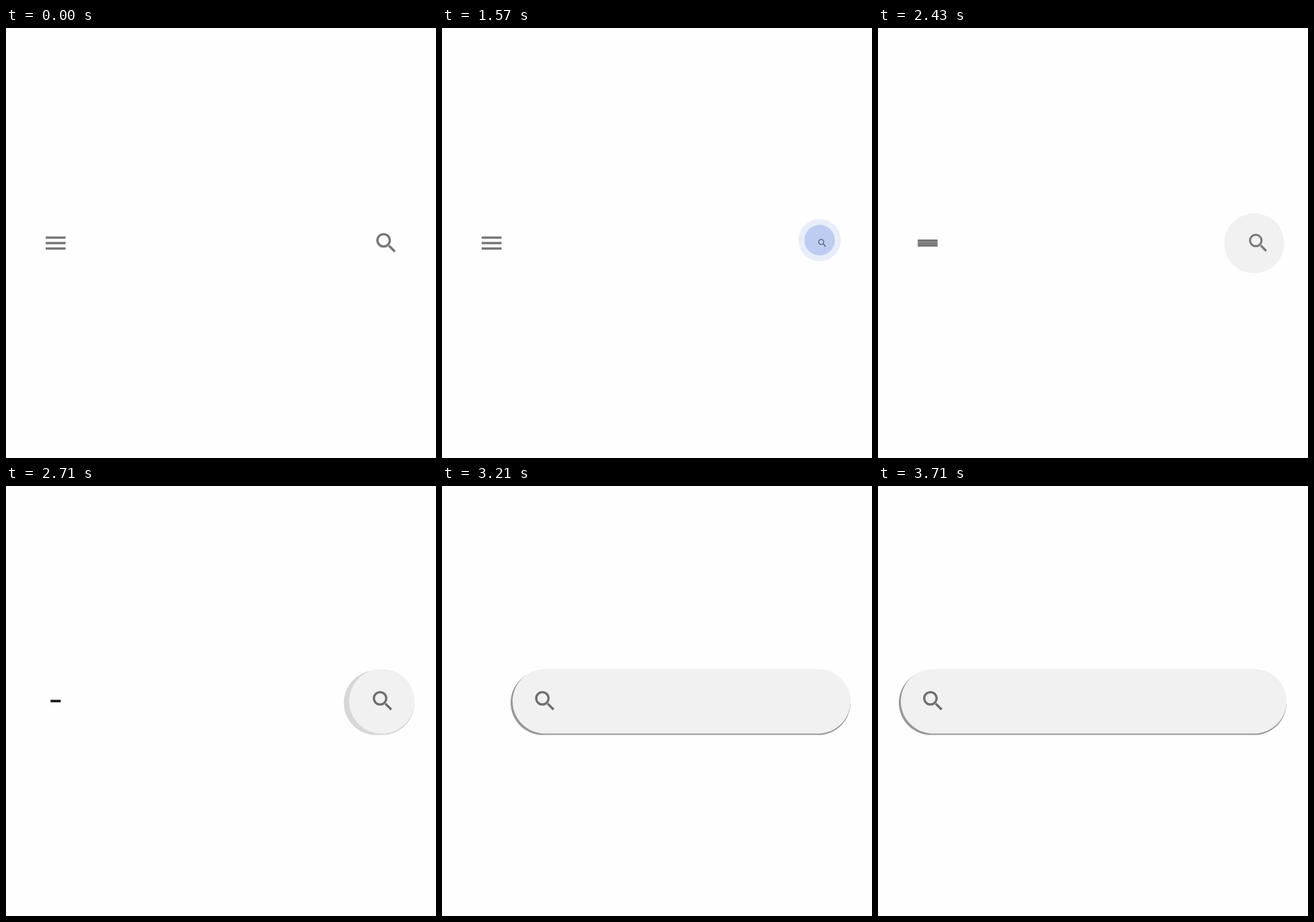
Animation of 640x640 px, one loop 5.07 s. Source, as an HTML page with a canvas:

```html
<!DOCTYPE html>
<html lang="en">
<head>
<meta charset="utf-8">
<title>Search bar</title>
<style>
  html, body { margin: 0; width: 100%; height: 100%; overflow: hidden; background: #fefefe; }
  canvas { display: block; width: 640px; height: 640px; }
</style>
</head>
<body>
<canvas id="stage" width="640" height="640"></canvas>
<script>
const ctx = document.getElementById('stage').getContext('2d');
const LOOP = 5070, FPS = 14;
const INK = 'rgba(0,0,0,.54)';

const clamp = v => Math.min(1, Math.max(0, v));
const span = (k, a, b) => clamp((k - a) / (b - a));
const smooth = u => u * u * (3 - 2 * u);
const easeOut = u => 1 - (1 - u) ** 3;

// cubic-bezier(x1, 0, x2, 1)
function bezier(u, x1, x2) {
  let lo = 0, hi = 1;
  for (let i = 0; i < 30; i++) {
    const s = (lo + hi) / 2, r = 1 - s;
    if (3 * x1 * s * r * r + 3 * x2 * s * s * r + s ** 3 < u) lo = s; else hi = s;
  }
  return smooth(lo);
}

function disc(x, y, r, fill) {
  ctx.fillStyle = fill;
  ctx.beginPath();
  ctx.arc(x, y, r, 0, Math.PI * 2);
  ctx.fill();
}

function pill(left, top, right, bottom, fill) {
  ctx.fillStyle = fill;
  ctx.beginPath();
  ctx.roundRect(left, top, right - left, bottom - top, (bottom - top) / 2);
  ctx.fill();
}

function glass(x, scale, alpha = 1) {
  if (scale <= 0) return;
  ctx.save();
  ctx.translate(x, 320);
  ctx.scale(scale, scale);
  ctx.globalAlpha = alpha;
  ctx.strokeStyle = INK;
  ctx.lineWidth = 3.3;
  ctx.beginPath();
  ctx.arc(-4, -4, 9.2, 0, Math.PI * 2);
  ctx.stroke();
  ctx.lineWidth = 3.6;
  ctx.beginPath();
  ctx.moveTo(4, 4);
  ctx.lineTo(12.7, 12.7);
  ctx.stroke();
  ctx.restore();
}

function menu(k) {
  const w = 29.6 * (1 - smooth(span(k, 36.4, 39.6)));
  const gap = 8.1 * (1 - smooth(span(k, 30, 37.5)));
  ctx.fillStyle = INK;
  for (const row of [-1, 0, 1]) ctx.fillRect(73.9 - w / 2, 318.4 + row * gap, w, 3.4);
}

function ripple(k) {
  const fade = 1 - span(k, 22, 24);
  const grow = easeOut(span(k, 17, 22));
  if (!fade || !grow) return;
  disc(562, 315.8, 31.4 * grow, `rgba(65,105,215,${0.115 * fade})`);
  disc(562, 315.8, 22.7 * grow, `rgba(65,105,215,${0.25 * fade})`);
}

function bar(k) {
  const grow = easeOut(span(k, 29, 37.5));
  const slide = bezier(span(k, 37.03, 51.6), 0.4, 0.14);
  const r = 48 * grow;
  const left = Math.min(560 - r, 516 - 482 * slide);
  const shade = span(k, 35.5, 42);
  if (shade) {
    const reach = 3 + 5 * (1 - smooth(span(k, 38, 44)));
    pill(left - reach, 322.6 - r, 608, 322.6 + r, `rgba(152,152,152,${shade})`);
  }
  pill(left, 320.4 - r, 560 + r, 320.4 + r, '#f1f1f1');
  glass(566 - 484 * slide, grow, grow);
}

function draw(t) {
  // the motion advances in steps of 1/14 s
  const k = Math.floor((t / 10 + 0.5) * FPS / 100);
  ctx.fillStyle = '#fefefe';
  ctx.fillRect(0, 0, 640, 640);
  menu(k);
  if (k < 29) {
    ripple(k);
    glass(566, (1 - span(k, 17, 27)) ** 1.3);
  } else {
    bar(k);
  }
}

const start = performance.now();
function tick() {
  draw((performance.now() - start) % LOOP);
  requestAnimationFrame(tick);
}
tick();
</script>
</body>
</html>
```
